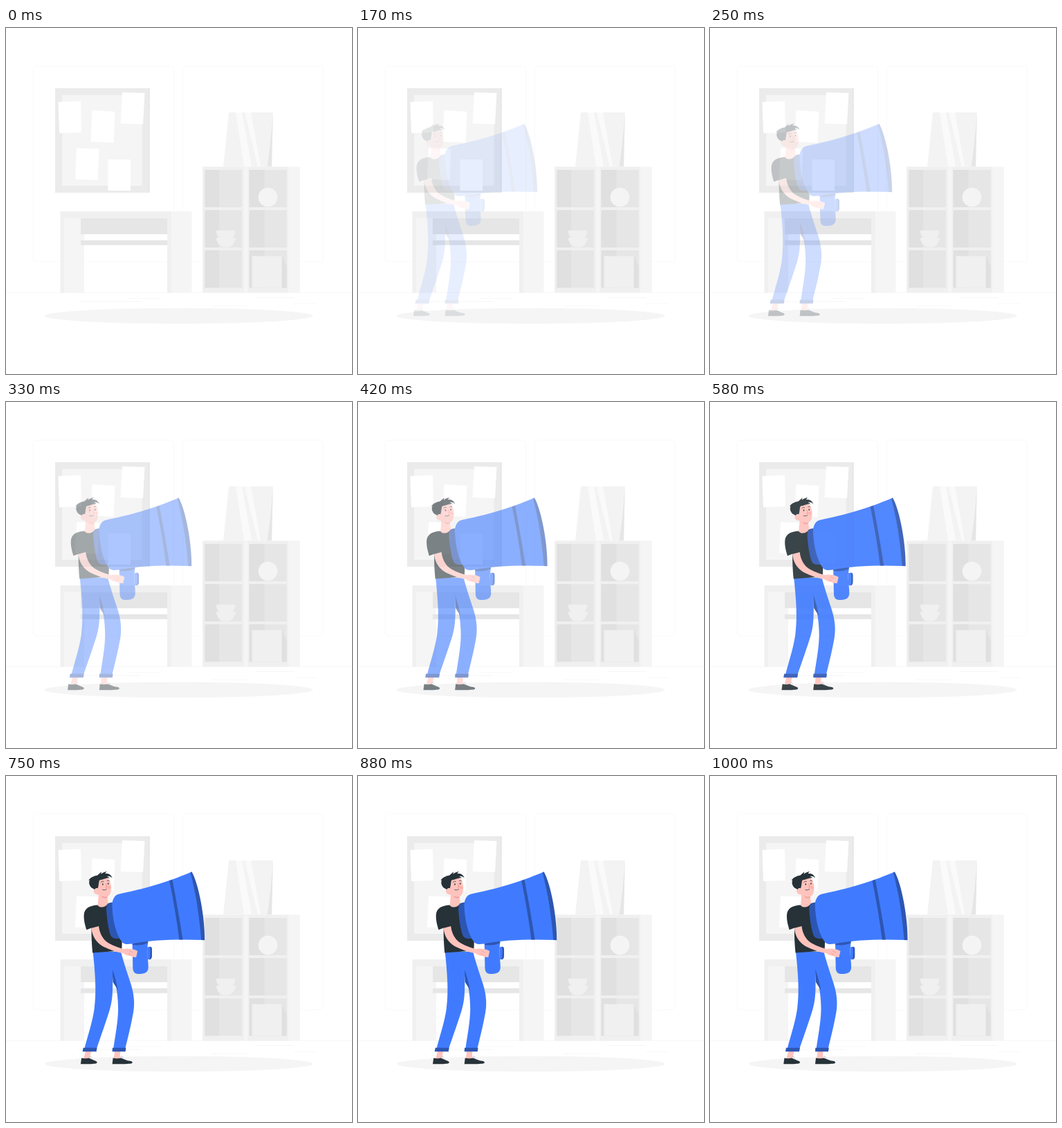
Write an HTML page that moves like this. It is 500 by 500 pixels and loops after 1040 ms.

```html
<!DOCTYPE html>
<html lang="en">
<head>
<meta charset="utf-8">
<title>Man with megaphone</title>
<style>
  html, body { margin: 0; width: 100%; height: 100%; overflow: hidden; background: #fff; }
  svg { display: block; width: 100%; height: 100%; }
  .blue { fill: #407bff; }
  .navy { fill: #2d56b3; }
  .dark { fill: #263238; }
  .skin { fill: #ffc3bd; }
  .line { fill: none; stroke: #263238; stroke-width: .7; stroke-linecap: round; }
  .lace { fill: none; stroke: #b9c4d6; stroke-width: .9; }
</style>
</head>
<body>
<svg viewBox="0 0 500 500">
  <!-- room -->
  <g fill="none" stroke="#ebebeb" stroke-width=".3">
    <rect x="39" y="55.2" width="203.6" height="282.5" rx="5.5"/>
    <rect x="255.3" y="55.2" width="203.2" height="282.5" rx="5.5"/>
    <path stroke-width=".4" d="M0 382.4H500M104 395.4H196M176 391H225M360 389.5H416M416 398.6H449M297 401.4H350"/>
  </g>

  <!-- notice board -->
  <path fill="#dcdcdc" d="M72 87H207.5V238H72Z"/>
  <path fill="#ebebeb" d="M71 87H206.5V238H71Z"/>
  <path fill="#f5f5f5" d="M81 97H196.5V228H81Z"/>
  <path fill="#fff" d="M75.5 107 108 105.5 109 151 77 152ZM124.500 119 157.5 121 155.5 166 122.5 164ZM168 93 200.5 94 198 139 165.5 138ZM102 173.5 134.5 174.5 132.5 220 100 218.5ZM147.5 190H180V235H147.5Z"/>

  <!-- desk -->
  <path fill="#f5f5f5" d="M84 275H113V382.4H84ZM238 265H268.5V382.4H238Z"/>
  <path fill="#f0f0f0" d="M78.5 265H238.5V382.4H233V275H84V382.4H78.5Z"/>
  <path fill="#e6e6e6" d="M108 275H233V298H108ZM108 306.8H233V313.8H108Z"/>

  <!-- bin -->
  <path fill="#f3f3f3" d="M322 122H385.8L384 200.5H314Z"/>
  <path fill="#fafafa" d="M332 122H341L355 200.5H344ZM345 122H354L368 200.5H364Z"/>
  <path fill="#e6e6e6" d="M385.8 122 384 200.5H377.5C381 178 384 150 385.8 122Z"/>

  <!-- shelves -->
  <path fill="#f5f5f5" d="M407 200.5H425V382.4H407Z"/>
  <path fill="#f0f0f0" d="M284 200.5H408V382.4H284Z"/>
  <path fill="#f5f5f5" d="M344 200.5H349.5V382.4H344Z"/>
  <g id="cells"></g>
  <circle cx="378.5" cy="244.5" r="13.8" fill="#f4f4f4"/>
  <path fill="#f0f0f0" d="M304 292.8H331C331.5 297 330 300 327.500 303H332C331 311 326 316.8 317.8 316.8S304.500 311 303.7 303H308C305 300 303.500 297 304 292.8Z"/>
  <path fill="#e0e0e0" d="M398.5 329.5 405.7 345V375.5H398.5Z"/>
  <path fill="#f0f0f0" d="M355.5 329.5H398.5V375.5H355.5Z"/>

  <ellipse cx="249.7" cy="416" rx="193.8" ry="11.3" fill="#f5f5f5"/>

  <g id="man">
    <!-- feet -->
    <path class="skin" d="M113.5 397H121.5L119 410H110ZM155.500 397H163.5L163 410H154Z"/>
    <path class="dark" d="M107.5 407.5C111 408.5 115 408.500 118 407.5L126 411C129 412 131 413 129.500 415C127 416.5 112 416.3 106.3 416.2Z"/>
    <path class="dark" d="M153 407.5C157 408.6 161 408.6 164.5 407.5L174 411.3C179 411.7 182 412.5 180.8 415C178 416.5 160 416.3 152 416.2Z"/>
    <path class="lace" d="M118 407.5 120 404.5 122.5 408M163.5 407.5 165.5 404.5 168 408.3"/>

    <!-- trousers -->
    <path class="blue" d="M140 254H164.5C169 272 175 288 179 301C183 314 184.8 327 182.5 341C179 361 174.5 378 170.5 395H153.5C156 376 160 358 160.5 338C160.5 322 159 302 150 275Z"/>
    <path class="navy" d="M151.5 277C154 285 158 296 160 309L153 298Z"/>
    <path class="blue" d="M124 254H157L152.5 279C152.5 305 153.5 320 148.5 337C143 355 135.5 376 129 395H111.5C116 377 123 357 126 337C129 313 128 292 124 254Z"/>
    <path class="navy" d="M110 392.8H130L129 398.3H109ZM152.3 392.8H171.8L171 398.3H152Z"/>

    <!-- torso and head -->
    <path class="dark" d="M131 186.5C121 187 111.5 190 111 201C110.7 209 113 217 114.8 222.3L122 219.5C121.700 233 122.5 244 123.5 255.5L165.5 252.5C167 236 166 215 161 187L152 183Z"/>
    <path class="skin" d="M132.5 169 131 187C135 191.5 142 190 146 184L144.5 170Z"/>
    <path fill="#f29d98" d="M136 173C138 177 142 177.5 145 175L144.8 174Z"/>
    <path class="skin" d="M130 153C133 147 145 145 148 150.5C150.5 156 151.5 164 149 170C147 175.5 139 176.5 134.5 171.5C131.5 172 127 171.5 125.5 168C124 164 127.5 161 130.5 163Z"/>
    <path class="dark" d="M122 161.500C119 158.500 117.500 154 119.500 150.500L117.700 151C119.500 147.500 124.500 144.500 130.500 143.500L136.500 138.300L135.500 141.800C138.500 139.500 141 138.300 144 138L141.500 141C146 140.500 150.500 142 152 147.500C149.500 144.800 147 144.500 144.500 145L149 147.500C143 146.500 139 150 133.500 150.500C132 154 132.700 158 131 162.500C129 161.500 127.500 162.300 126.500 164Z"/>
    <ellipse class="dark" cx="138.3" cy="156.5" rx=".8" ry="1.2"/>
    <ellipse class="dark" cx="146" cy="155.5" rx=".8" ry="1.2"/>
    <path class="line" d="M135.5 153.5Q137.5 151.5 139.5 152.3M144.500 151.5Q146 150.5 147.5 151.5M138 164.5Q141 166 143.8 163.5"/>
    <path fill="none" stroke="#ed847e" stroke-width=".8" d="M142.5 155.5 144.5 160.5 142 161"/>
    <circle cx="147.5" cy="161" r="2.3" fill="#ff9c95" opacity=".5"/>

    <!-- megaphone -->
    <path class="navy" d="M155 182.5C146 182 142.7 186 143.5 195C144.500 209 146.7 223 150 231C153 235.5 158 235 164 235Z"/>
    <path class="blue" d="M202.5 247.5C206 246 209 246.5 209 250V260C209 265 206 266 202.8 264.5Z"/>
    <path class="navy" d="M206.3 246.5C208.500 246.800 209.300 248 209.300 250V260C209.300 263.500 208 265 206 265.200C207.300 259 207.300 252 206.300 246.500Z"/>
    <path class="blue" d="M181 242 204 237.5 202.5 250C202.5 262 204.5 270 204 278C203 284.5 198 286 189 286C184 286 181.7 282 181.7 277Z"/>
    <path class="navy" d="M181 241 204 237 203.2 241.5C196 244.5 189 245 181.2 244Z"/>
    <path class="blue" d="M266.5 138.5C240 150 210 160.5 162 170.5C155 172 151.5 179 151.8 188C152.5 207 157 229 166.5 240.5C170 243.5 174 243.3 180 242.5C210 236.5 245 235.8 284 237Z"/>
    <path class="navy" d="M234.5 151.3 238.8 149.7C244 176 249 205 254 236.4H248.7C245 207 240 178 234.5 151.3Z"/>
    <path class="navy" d="M266.8 138.2C277 156 286 205 285.5 237.2L280.5 237C278 202 272 167 265 140Z"/>

    <!-- arm -->
    <path class="skin" d="M122 219.7C122.5 230 128 240 138 246C148 251 159 255 168 256C172 260 178 259.5 181 261.5L186.5 262L188.5 253C182 249.5 175 249 169 250C158 247.5 147 243 141 237C136 231 133.5 225 132.5 217Z"/>
    <path fill="none" stroke="#ed847e" stroke-width=".6" d="M177 252.5 182 255.5M175 256 179 258.5"/>
  </g>
</svg>
<script>
  const LOOP = 1040, FPS = 24, DURATION = 1000, TRAVEL = 30;
  const SHUTTER = 15;   // each step shows the motion slightly after its start
  const ROUNDING = 4;   // step times are rounded to 10 ms
  const man = document.getElementById('man');

  // Shelf compartments: a shaded left part and a lighter right part.
  const rect = (x, y, w, h, fill) =>
    `<rect x="${x}" y="${y}" width="${w}" height="${h}" fill="${fill}"/>`;
  let cells = '';
  for (const [x, width, shade] of [[287.5, 53.5, 20.5], [351.5, 54.2, 22]]) {
    for (let row = 0; row < 3; row++) {
      const y = 205 + row * 58.2;
      cells += rect(x, y, width, 54, '#e6e6e6') + rect(x, y, shade, 54, '#e0e0e0');
    }
  }
  document.getElementById('cells').innerHTML = cells;

  const bezier = (a, b, s) => 3 * (1 - s) ** 2 * s * a + 3 * (1 - s) * s * s * b + s ** 3;

  // cubic-bezier(.36, -.01, .5, 1.38): slight overshoot before settling
  function ease(x) {
    if (x >= 1) return 1;
    let low = 0, high = 1;
    for (let i = 0; i < 30; i++) {
      const mid = (low + high) / 2;
      if (bezier(.36, .5, mid) < x) low = mid; else high = mid;
    }
    return bezier(-.01, 1.38, low);
  }

  function draw(now) {
    const step = Math.floor((now % LOOP + ROUNDING) * FPS / 1000);
    const progress = ease((step * 1000 / FPS + SHUTTER) / DURATION);
    man.setAttribute('opacity', step < 3 ? 0 : Math.min(1, progress));
    man.setAttribute('transform', `translate(${TRAVEL * (progress - 1)} 0)`);
  }

  const start = performance.now();
  function tick() {
    draw(performance.now() - start);
    requestAnimationFrame(tick);
  }
  draw(0);
  requestAnimationFrame(tick);
</script>
</body>
</html>
```
